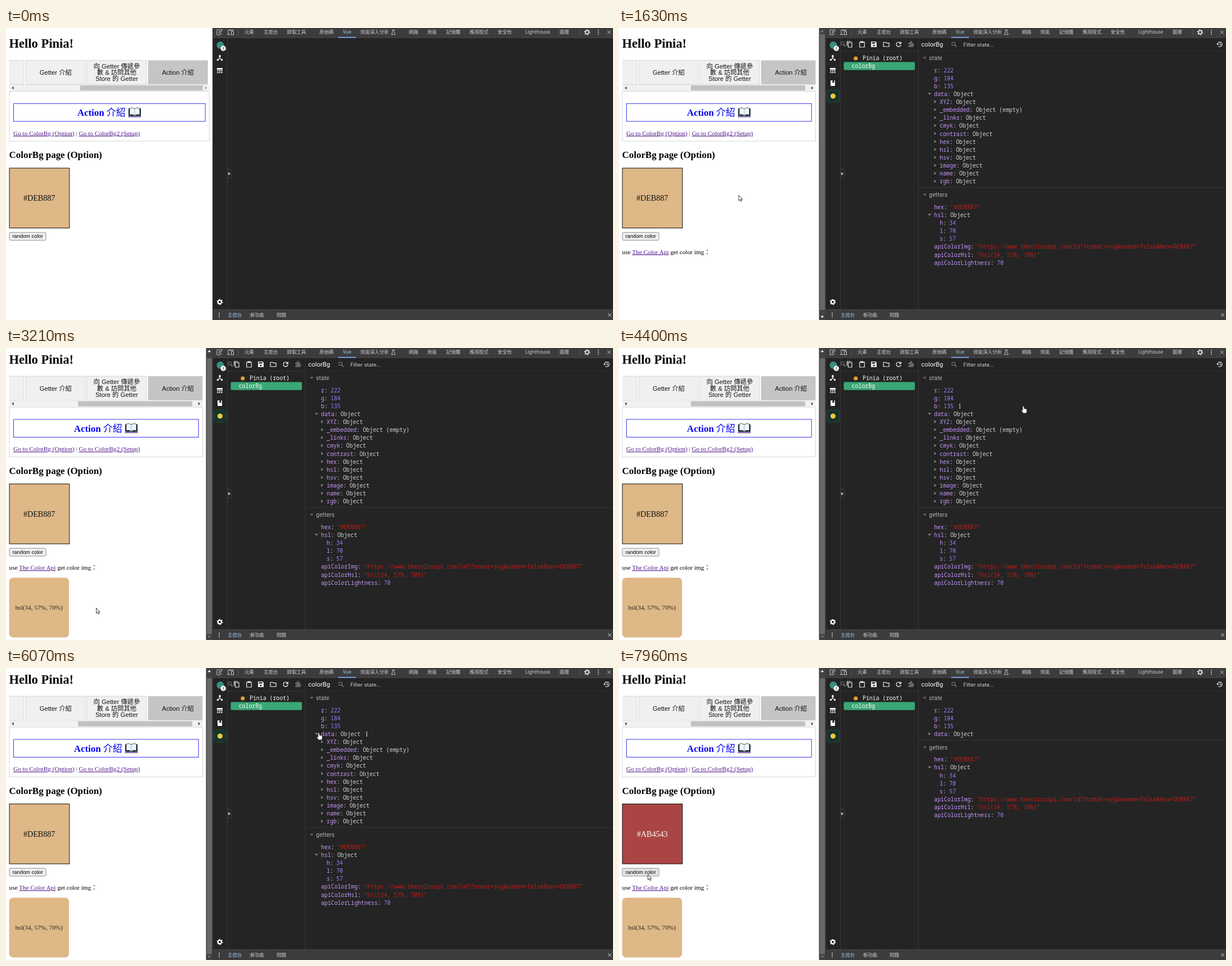
An HTML page that plays this animation: 1079x519 px, repeating every 8000 ms.

```html
<!DOCTYPE html>
<html lang="zh-Hant">
<head>
<meta charset="utf-8">
<title>Pinia devtools</title>
<style>
html, body { margin: 0; width: 100%; height: 100%; overflow: hidden; background: #fff; }
svg { display: block; }
text { white-space: pre; }
.serif { font-family: "Liberation Serif", "Noto Sans CJK TC", "Noto Sans CJK", serif; }
.sans { font-family: "Liberation Sans", "Noto Sans CJK TC", "Noto Sans CJK", sans-serif; }
.ui { font-family: "Noto Sans", "Noto Sans CJK TC", "Noto Sans CJK", sans-serif; }
.roboto { font-family: Roboto, sans-serif; }
.mono { font-family: "Noto Sans Mono", monospace; }
.link { fill: #551a8b; text-decoration: underline; }
</style>
</head>
<body>
<svg width="1079" height="519" viewBox="0 0 1079 519">
  <g id="page"></g>
  <g id="scrollbar"></g>
  <g id="tools"></g>
  <g id="dots" fill="#fff"><circle cy="-3.2" r="1"/><circle r="1"/><circle cy="3.2" r="1"/></g>
  <path id="arrow" d="M0 0V9.6L2.2 7.6L3.7 11L5.2 10.3L3.7 7.1H6.6Z" fill="#fff" stroke="#111" stroke-width=".8"/>
  <path id="hand" d="M-1.3 1Q0-.6 1.2 1V4.6Q2.2 3.8 3 5Q4 4.3 4.8 5.5Q6 5 6.2 6.6V9.4Q6 11 5 12.8H-.6Q-1 11.4-3.4 8.4Q-3.6 7-2.2 7.2L-1.3 8Z" fill="#fff" stroke="#111" stroke-width=".7"/>
</svg>
<script>
const LOOP = 8000, TAN = '#deb887';
const $ = id => document.getElementById(id);
const rect = (x, y, w, h, fill, more = '') =>
  `<rect x="${x}" y="${y}" width="${w}" height="${h}" fill="${fill}" ${more}/>`;
const text = (x, y, s, size, fill, font, more = '') =>
  `<text x="${x}" y="${y}" font-size="${size}" fill="${fill}" class="${font}" ${more}>${s}</text>`;
const path = (d, fill, more = '') => `<path d="${d}" fill="${fill}" ${more}/>`;
const stroke = (d, color, w = 1) => path(d, 'none', `stroke="${color}" stroke-width="${w}"`);
const circle = (x, y, r, fill) => `<circle cx="${x}" cy="${y}" r="${r}" fill="${fill}"/>`;
const at = (x, y, body) => `<g transform="translate(${x} ${y})">${body}</g>`;
const triangle = (x, y, angle, r, fill) =>
  `<path transform="translate(${x} ${y}) rotate(${angle})" d="M${-r * .6} ${-r}L${r * .7} 0L${-r * .6} ${r}Z" fill="${fill}"/>`;
const MID = 'text-anchor="middle"', BOLD = 'font-weight="bold"';

function drawPage(loaded, color, hex, ink, image) {
  const right = loaded ? 349.5 : 361.5, mid = (13 + right - 7) / 2;
  const tab = (x, w, lines, active) => rect(x, 57.5, w, 43, active ? '#c6c4c5' : '#f0f0f0', active ? '' : 'stroke="#ccc" stroke-width=".8"') +
    lines.map((s, i) => text(x + w / 2, 83 + (i - (lines.length - 1) / 2) * 11.3, s, 11.27, '#111', 'sans', MID)).join('');
  const thumb = loaded ? [128, 203] : [132, 218];
  let out = text(5.6, 35, 'Hello Pinia!', 22.5, '#000', 'serif', BOLD) +
    `<clipPath id="clip"><rect x="5.6" y="56" width="${right - 5.6}" height="57"/></clipPath><g clip-path="url(#clip)">` +
    tab(-74, 106, ['']) + tab(35.2, 106, ['Getter 介紹']) +
    tab(144, 105.7, ['向 Getter 傳遞參', '數 &amp; 訪問其他', 'Store 的 Getter']) +
    tab(252.5, 106.3, ['Action 介紹'], true) + rect(5.6, 101, 360, 11, '#f1f1f1') +
    rect(thumb[0], 102, thumb[1], 9, '#c1c1c1') + triangle(12, 106.5, 180, 2.8, '#505050') +
    triangle(right - 6, 106.5, 0, 2.8, loaded ? '#505050' : '#a3a3a3') + '</g>' +
    rect(6, 112.5, right - 6, 88.5, 'none', 'stroke="#ccc" stroke-width=".8"') +
    rect(13.5, 134.3, right - 20.8, 31.7, 'none', 'stroke="#2222ee" stroke-width=".9"') +
    at(mid - 57, 156, text(0, 0, 'Action <tspan font-weight="400">介紹</tspan>', 16.9, '#00e', 'serif', BOLD) +
      at(102, -6.5, path('M-11 -6.5V7H11V-6.5Z', '#14213d') +
        path('M-9 -7Q-4-9 0-6Q4-9 9-7V5Q4 3 0 6Q-4 3-9 5Z', '#edf6fa', 'stroke="#222" stroke-width=".7"') +
        stroke('M0 -6V6', '#8aa', .8) + stroke('M-11.5 8.4H11.5', '#2b0a80', 1.1))) +
    text(13, 190.6, '<tspan class="link">Go to ColorBg (Option)</tspan> | <tspan class="link">Go to ColorBg2 (Setup)</tspan>', 11.27, '#557', 'serif') +
    text(5.6, 231, 'ColorBg page (Option)', 16.9, '#000', 'serif', BOLD) +
    rect(6, 249, 106.7, 106.5, color, 'stroke="#111" stroke-width="1"') +
    text(59.2, 307, hex, 14.08, ink, 'serif', MID) +
    rect(6, 363.3, 65, 14, '#efefef', 'id="button" rx="2" stroke="#767676" stroke-width=".8"') +
    text(38.5, 373.4, 'random color', 9.4, '#000', 'sans', MID);
  if (loaded) out += text(5.6, 401.5, 'use <tspan class="link">The Color Api</tspan> get color img：', 11.27, '#000', 'serif');
  if (image) out += rect(5.6, 415.6, 106.4, 106.4, TAN, 'rx="7"') + text(58.7, 472.6, 'hsl(34, 57%, 70%)', 11.27, '#222', 'serif', MID);
  return out;
}

const drawScrollbar = scroll => rect(355.5, 0, 12, 519, '#424242') + rect(357, 11 + scroll, 9, 490, '#686868') +
  triangle(361.3, 5.5, -90, 2.8, scroll > 0 ? '#fff' : '#777') + triangle(361.3, 513.5, 90, 2.8, scroll < 7 ? '#fff' : '#777');

const gear = (x, y, color) => at(x, y, `<circle r="3.1" fill="none" stroke="${color}" stroke-width="2.2"/>` +
  `<circle r="4.6" fill="none" stroke="${color}" stroke-width="1.5" stroke-dasharray="2 2.82"/>`);
const more = (x, y) => [-3.3, 0, 3.3].map(d => circle(x, y + d, 1, '#ccc')).join('');
const cross = (x, y) => stroke(`M${x - 3} ${y - 3}l6 6m0 -6l-6 6`, '#ccc');
const lens = (x, y) => at(x, y, '<circle cx="-1" cy="-1" r="3" fill="none" stroke="#888"/>' + stroke('M1 1L4.5 4.5', '#888', 1.2));

function drawFrame() {
  const tabs = [[424, '元素'], [458, '主控台'], [499.5, '錄製工具'], [557, '原始碼'], [599, 'Vue'], [630, '效能深入分析'], [716, '網路'],
    [749, '效能'], [782.5, '記憶體'], [824, '應用程式'], [874, '安全性'], [923, 'Lighthouse'], [984, '圖層']];
  const label = (x, y, s, on) => text(x, y, s, 8.45, on ? '#9fc6f5' : '#d0d0d0', 'ui');
  return rect(367, 0, 712, 519, '#242424') + rect(367, 0, 712, 17, '#3c3c3c') + rect(367, 500, 712, 19, '#3c3c3c') +
    stroke('M367 17.5H1079M367 500.5H1079', '#4a4a4a', .8) + stroke('M367.5 0V519M393.5 18V500', '#383838') +
    tabs.map(([x, s]) => label(x, 10.3, s, s === 'Vue')).join('') + rect(590.5, 15.8, 31.5, 1.7, '#7cacf8') +
    stroke('M412.5 2V13M1020.5 2V13', '#606060', .8) +
    stroke('M382 12H375V3H384V6M379 6L384 11M379 10V6H383M397 4H404M395 11V3.5H404M400.5 6H404.5V12H400.5ZM393 11.5H399', '#ccc') +
    stroke('M686 3.5H691M687.3 4V7L685 11.5H692L689.7 7V4', '#ccc', .9) +
    gear(1033, 7.5, '#d0d0d0') + more(1053, 7.5) + cross(1072, 7.5) + more(379, 510) + cross(1073, 510) +
    label(394, 513.3, '主控台', true) + label(434, 513.3, '新功能') + label(481, 513.3, '問題') +
    circle(381, 30.5, 6.5, '#3c8f80') + circle(386.3, 36.2, 4.7, '#fff') +
    text(386.3, 39, '!', 8, '#111', 'sans', MID + BOLD) +
    at(380, 53, circle(0, -3, 1.9, '#fff') + circle(-3.6, 3.6, 1.7, '#fff') + circle(3.6, 3.6, 1.7, '#fff') + stroke('M-3.6 3.6L0 .3L3.6 3.6M0 -3V.3', '#fff', 1.2)) +
    at(380, 75.5, rect(-5, -4.5, 10, 3.2, '#fff') + stroke('M-5 .7H5M-5 3.7H5', '#fff', 1.5) + stroke('M-2.5 0V5M1.5 0V5', '#242424', .8)) +
    gear(380, 487, '#fff') + path('M394 251H399Q401 251 401 253V265Q401 267 399 267H394Z', '#242424', 'stroke="#484848" stroke-width=".8"') +
    triangle(397, 259, 0, 2.7, '#ddd');
}

function drawTree(selected) {
  const icons = [
    [410, stroke('M-2.5 -3H4V5H-2.5ZM-4.5 2.5V-5H2.5', '#eee', 1.2)],
    [432, stroke('M-4.3 -3.8H4.3V5H-4.3Z', '#eee', 1.2) + rect(-2.5, -5.5, 5, 3, '#eee')],
    [453, path('M-5 -5H3L5 -3V5H-5Z', '#eee') + rect(-3.5, -3.7, 6, 2.4, '#242424') + circle(0, 2, 1.6, '#242424')],
    [475, stroke('M-5 -3.5H-1L.3 -2.3H5V4H-5Z', '#eee', 1.2)],
    [497, stroke('M3.3 -2.2A4 4 0 1 0 3.9 1', '#eee', 1.3) + path('M4.8 -5V-.5H.5Z', '#eee')],
    [519, path('M-5 -3H-2Q-2 -6 0 -6T2 -3H4V0Q6 0 6 1.7T4 3.4V5H-5V2.5Q-2.5 2.5-2.5 1T-5 -.5Z', '#666')]
  ];
  return at(380, 98, rect(-4, -5, 8, 10, '#fff', 'rx="1"') + path('M-.5 -5H2.5V0L1 -1L-.5 0Z', '#242424')) +
    rect(369.5, 110, 22, 22, '#17332a', 'rx="3.5" stroke="#2b5544" stroke-width=".7"') + circle(380.5, 121, 4.6, '#ecc83f') +
    lens(398.5, 28.5) + icons.map(([x, body]) => at(x, 29, body)).join('') + stroke('M394 41H531.5', '#383838') +
    circle(420.8, 54, 3.6, '#e5a12d') + text(433, 57, 'Pinia (root)', 9.87, '#fff', 'mono') +
    (selected ? rect(399.5, 60.5, 126.5, 14.2, '#3ba776', 'rx="2.5"') : '') +
    text(413.7, 71.3, 'colorBg', 9.87, '#fff', 'mono');
}

const KEYS = ['XYZ', '_embedded', '_links', 'cmyk', 'contrast', 'hex', 'hsl', 'hsv', 'image', 'name', 'rgb'];
const STEP = 14.13, CHAR = 5.92, NUM = '#997fff', STR = '#c41a16', NIL = '#999', OBJ = '#d4d4d4';
let rows = [];

function drawState(data) {
  rows = [];
  let y = 75, out = '';
  const row = (key, value, color, fold, depth = 0) => {
    const x = 560 + depth * 10, vx = x + (key.length + 1) * CHAR + 5.2;
    if (fold) out += triangle(x - 8, y - .5, fold === 'open' ? 90 : 0, 2.9, '#808080');
    out += text(x, y + 3.5, `${key}<tspan fill="#ddd">:</tspan>`, 9.87, '#c996ff', 'mono') +
      text(vx, y + 3.5, value.replace(/&/g, '&amp;'), 9.87, color, 'mono');
    rows.push({ y, end: vx + value.length * CHAR });
    y += STEP;
  };
  const header = (hy, s) => triangle(543.5, hy, 90, 2.7, '#777') + text(551, hy + 3.6, s, 10.55, '#b0b0b0', 'roboto');
  out += stroke('M532 18V500', '#383838') + stroke('M532 41H1079', '#303030') +
    text(537.3, 33, 'colorBg', 11.35, '#fff', 'roboto') + lens(595.5, 29) +
    text(612, 33, 'Filter state...', 9.85, '#ccc', 'roboto') +
    at(1068, 29, stroke('M-3.8 -1.5A4.2 4.2 0 1 1 -2.7 3.2M.5 -2.5V.5L2.7 1.8', '#eee', 1.1) + path('M-6 -1H-1.8L-4 1.7Z', '#eee')) +
    header(53, 'state');
  row('r', '222', NUM); row('g', '184', NUM); row('b', '135', NUM);
  if (data === 'null') row('data', 'null', NIL);
  else row('data', 'Object', OBJ, data);
  if (data === 'open') KEYS.forEach(k => row(k, k === '_embedded' ? 'Object (empty)' : 'Object', OBJ, 'closed', 1));
  out += stroke(`M532 ${y - 3.5}H1079`, '#383838') + header(y + 9.5, 'getters');
  y += 31.3;
  row('hex', '"#DEB887"', STR);
  row('hsl', 'Object', OBJ, 'open');
  row('h', '34', NUM, '', 1); row('l', '70', NUM, '', 1); row('s', '57', NUM, '', 1);
  const loaded = data !== 'null';
  row('apiColorImg', loaded ? '"https://www.thecolorapi.com/id?format=svg&named=false&hex=DEB887"' : 'undefined', loaded ? STR : NIL);
  row('apiColorHsl', loaded ? '"hsl(34, 57%, 70%)"' : 'undefined', loaded ? STR : NIL);
  row('apiColorLightness', loaded ? '70' : 'undefined', loaded ? NUM : NIL);
  return out;
}

// Pointer path: time, x, y
const POINTER = [[390, 690, 519], [870, 631, 178], [1220, 631, 178], [1430, 500, 236], [1640, 200, 300], [1850, 33, 346],
  [2049, 33, 346], [2050, 40, 425], [2390, 107.5, 452.5], [2660, 107.5, 452.5], [3210, 160.5, 462], [3420, 160.5, 462],
  [3490, 150, 474], [3630, 100, 468], [3840, 260, 430], [4050, 480, 250], [4190, 654, 82], [4470, 740, 110],
  [4680, 778, 170], [4890, 640, 230], [5100, 600, 233], [5320, 576.5, 366], [5460, 600, 402], [5600, 775, 398],
  [5860, 690, 127], [6070, 556, 115], [6329, 556, 115], [6330, 553, 112], [6470, 553, 112], [6670, 336, 239],
  [6869, 336, 239], [6870, 223.5, 327.5], [7300, 110, 356], [7630, 51.5, 367], [LOOP, 51.5, 367]];

function pointerAt(t) {
  const i = POINTER.findIndex(p => p[0] > t), [t0, x0, y0] = POINTER[i - 1], [t1, x1, y1] = POINTER[i];
  const k = (t - t0) / (t1 - t0);
  return [x0 + (x1 - x0) * k, y0 + (y1 - y0) * k];
}

const move = (el, x, y) => el.setAttribute('transform', `translate(${x} ${y})`);
const show = (el, on) => el.setAttribute('visibility', on ? 'visible' : 'hidden');
const CUTS = [120, 320, 1430, 2050, 6470, 7960];
let drawn = -1;

function rebuild(stage) {
  const loaded = stage >= 3, changed = stage >= 6;
  $('page').innerHTML = drawPage(loaded, changed ? '#ab4543' : TAN, changed ? '#AB4543' : '#DEB887', changed ? '#fff' : '#111', stage >= 4);
  rows = [];
  $('tools').innerHTML = drawFrame() + (stage >= 1 ? drawTree(stage >= 2) : '') +
    (stage >= 2 ? drawState(stage < 3 ? 'null' : stage < 5 ? 'open' : 'closed') : '');
  drawn = stage;
}

function render() {
  const t = performance.now() % LOOP;
  const stage = CUTS.filter(c => t >= c).length;
  if (stage !== drawn) rebuild(stage);
  const scroll = 7.4 * Math.min(1, Math.max(0, (t - 2660) / 140));
  move($('page'), 0, -scroll);
  $('scrollbar').innerHTML = stage >= 3 ? drawScrollbar(scroll) : '';

  const visible = t >= POINTER[0][0];
  const [x, y] = visible ? pointerAt(t) : [0, 0];
  const overState = visible && x > 537;
  const hover = overState && rows.find(r => Math.abs(r.y - y) < STEP / 2);
  const overButton = visible && x < 71 && y > 363 - scroll && y < 377 - scroll;
  move($('arrow'), x, y);
  move($('hand'), x, y);
  show($('arrow'), visible && !overState);
  show($('hand'), overState);
  show($('dots'), hover);
  if (hover) move($('dots'), hover.end + 11, hover.y);
  $('button').setAttribute('fill', !overButton ? '#efefef' : t >= 7890 && t < 7960 ? '#f5f5f5' : '#e5e5e5');
  requestAnimationFrame(render);
}
render();
</script>
</body>
</html>
```
